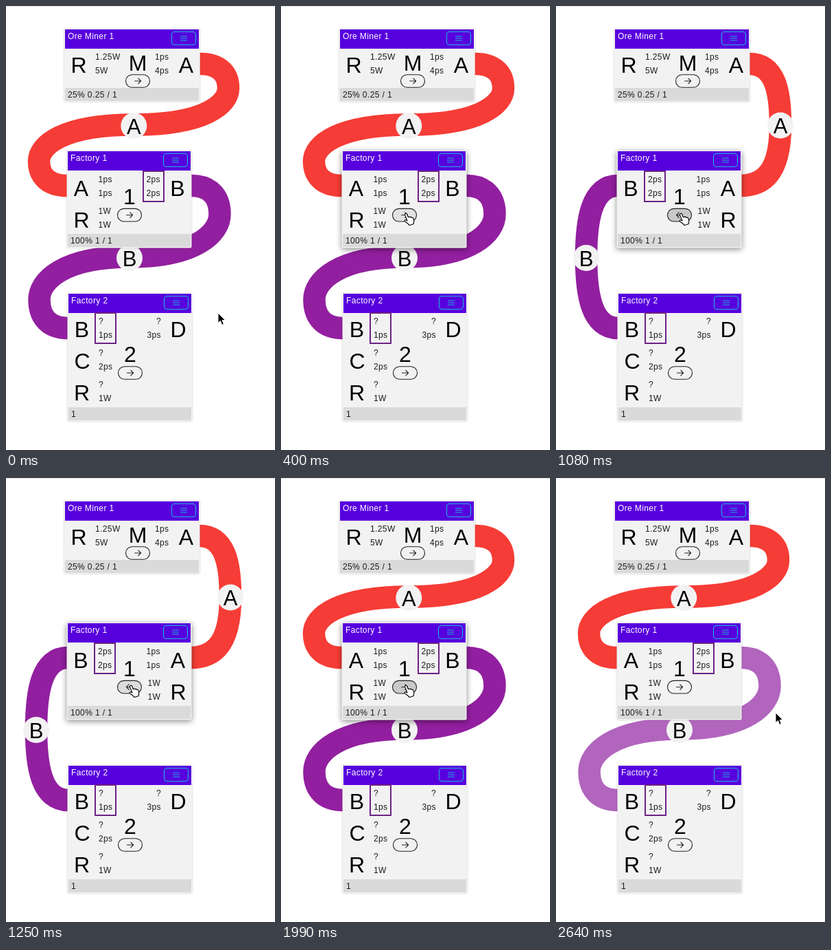
Animation of 392 by 645 pixels, one loop 2720 ms. Source, as an HTML page:

```html
<!DOCTYPE html>
<html lang="en">
<head>
<meta charset="utf-8">
<title>Factory flow</title>
<style>
html, body { margin: 0; width: 100%; height: 100%; overflow: hidden; background: #fff; }
svg { display: block; font: 12px "Liberation Sans", Arial, sans-serif; fill: #1c1c1c; }
.small { letter-spacing: .38px; }
.title { fill: #fff; }
.big { font-size: 32px; text-anchor: middle; fill: #000; }
.label { font-size: 31px; text-anchor: middle; fill: #000; }
.pipe { fill: none; stroke-width: 32.5; }
.line { fill: none; stroke-width: 1.1; stroke-linecap: round; stroke-linejoin: round; }
.box { fill: none; stroke: #6c2383; stroke-width: 2; }
.body { fill: #f2f2f2; filter: drop-shadow(0 0 1px #0003); }
.body.raised { filter: drop-shadow(0 2px 4px #0007); }
</style>
</head>
<body>
<svg id="stage" width="392" height="645" viewBox="0 0 392 645"></svg>
<script>
const LOOP = 2720, STEP = 80;
const RED = '#f63c36', PURPLE = '#921f9f', PURPLE_HOVER = '#b165bd';

const small = (x, y, s, cls = '') => `<text class="small ${cls}" x="${x}" y="${y}">${s}</text>`;
const big = (x, y, s) => `<text class="big" x="${x}" y="${y}">${s}</text>`;
const pair = (x, y, a, b) => small(x, y, a) + small(x, y + 20, b);
const box = (x, y) => `<rect class="box" x="${x}" y="${y}" width="30" height="44"/>`;

const pipe = (d, color) => `<path class="pipe" stroke="${color}" d="${d}"/>`;
const label = (x, y, s) =>
  `<circle cx="${x}" cy="${y}" r="19" fill="#f2f2f2"/><text class="label" x="${x}" y="${y + 11.5}">${s}</text>`;

// S-shaped pipe: a tight corner, then a long run into the flat middle, and the same mirrored
function bend(x1, y1, x2, y2) {
  const mx = (x1 + x2) / 2, my = (y1 + y2) / 2, h = my - y1;
  const right = x1 + 41.5, left = x2 - 41.5;
  return `M${x1},${y1}C${x1 + 26},${y1} ${right},${y1 + .14 * h} ${right},${y1 + .4 * h}` +
    `S${right - 34},${my} ${mx},${my}` +
    `C${left + 34},${my} ${left},${y2 - .66 * h} ${left},${y2 - .4 * h}` +
    `C${left},${y2 - .14 * h} ${x2 - 26},${y2} ${x2},${y2}`;
}

function pill(x, y, dir = 1, fill = 'none') {
  return `<g class="line" stroke="#222" transform="translate(${x} ${y})">
    <rect x="-17.5" y="-9.3" width="35" height="18.6" rx="9.3" fill="${fill}"/>
    <path transform="scale(${dir} 1)" d="M-4.5,0H4.5M.8,-3.8L4.6,0L.8,3.8"/></g>`;
}

function card(x, y, w, h, title, status, content, raised) {
  const r = x + w, b = y + h;
  return `<rect class="body ${raised ? 'raised' : ''}" x="${x - 1.5}" y="${y - 1}" width="${w + 3}" height="${h + 2.5}" rx="2"/>
    <rect x="${x}" y="${y}" width="${w}" height="28" fill="#5700de"/>
    <rect x="${x}" y="${b - 19}" width="${w}" height="19" fill="#dadada"/>
    <g class="line" stroke="#1bb4dc">
      <rect x="${r - 39.5}" y="${y + 3.5}" width="35" height="19" rx="4"/>
      <path d="M${r - 26.5},${y + 10}h9m-9,3h9m-9,3h9"/></g>
    ${small(x + 4, y + 14, title, 'title')}${small(x + 4, b - 5, status)}${content}`;
}

const minerCard = card(86, 34, 195, 104, 'Ore Miner 1', '25% 0.25 / 1',
  big(106, 97, 'R') + pair(130, 78, '1.25W', '5W') + big(192, 94, 'M') + pill(192, 109) +
  pair(217, 78, '1ps', '4ps') + big(262.5, 97, 'A'));

const lastCard = card(91, 418, 179, 184, 'Factory 2', '1',
  big(110.5, 481, 'B') + big(111, 527, 'C') + big(110.5, 573, 'R') +
  pair(135, 462, '?', '1ps') + pair(135, 508, '?', '2ps') + pair(135, 554, '?', '1W') +
  box(130, 446) + big(181, 517, '2') + pill(181, 533) +
  small(219, 462, '?') + small(205.5, 482, '3ps') + big(251, 481, 'D'));

function middleCard(flipped, raised, fill) {
  const sides = flipped
    ? big(109, 276, 'B') + box(129, 240) + pair(134, 256, '2ps', '2ps') +
      pair(204.5, 256, '1ps', '1ps') + pair(206.5, 302, '1W', '1W') +
      big(250.5, 276, 'A') + big(251, 322, 'R')
    : big(109.5, 276, 'A') + big(110, 322, 'R') + pair(134.5, 256, '1ps', '1ps') +
      pair(134.5, 302, '1W', '1W') + box(200, 240) +
      pair(204.5, 256, '2ps', '2ps') + big(250, 276, 'B');
  return card(90, 211, 179, 139, 'Factory 1', '100% 1 / 1',
    sides + big(180, 288, '1') + pill(180, 303.7, flipped ? -1 : 1, fill), raised);
}

function pipes(flipped, purple) {
  return flipped
    ? pipe('M281,84C320,84 327,125 327,173S316,261 269,261', RED) + label(327, 173.5, 'A') +
      pipe('M90,261C52,261 44,310 44,365S52,468 91,468', purple) + label(44, 366, 'B')
    : pipe(bend(282.5, 84, 89.5, 261), RED) + label(186.3, 174, 'A') +
      pipe(bend(270, 261, 90, 468), purple) + label(180, 366, 'B');
}

const arrow = (x, y) => `<path transform="translate(${x} ${y})" fill="#000" stroke="#fff" stroke-width="1"
  d="M0,0V14.5L3.4,11.4L5.8,17.3L8.4,16.2L6,10.5H10.6Z"/>`;
const hand = `<path transform="translate(180 301)" fill="#fff" stroke="#000" stroke-width="1.1" stroke-linejoin="round"
  d="M1,.8C2,-.2 3.2,.4 3.6,1.6L5.4,6C5.8,4.7 7.4,4.8 8,6C8.6,5 10,5.2 10.5,6.6C11.4,5.9 12.5,6.4 13,7.8
  C14,10.5 14,12.5 13.4,15.5L7.2,17.6C5.5,15 3,13.8 .6,11.8C-.4,10.6 .8,9.3 2.4,10L4,11L.6,2.6C.3,1.8 .5,1.2 1,.8Z"/>`;

// Button fill by start time: hover, press, ripple, fade
const FILLS = [[0, 'none'], [400, '#e1e1e1'], [1000, '#d8d8d8'], [1080, '#c9c9c9'], [1250, '#dcdcdc'],
  [1910, '#d5d5d5'], [1990, '#c9c9c9'], [2070, '#d8d8d8'], [2230, '#e1e1e1'], [2640, 'none']];

function cursor(t) {
  if (t >= 2640) return { x: 320, y: 341 };
  const u = Math.min(Math.floor(t / STEP) / 5, 1), p = u * u * (3 - 2 * u);
  return { x: 309 - 128 * p, y: 446 - 144 * p, onButton: u === 1, onCard: u >= .6 };
}

function scene(t) {
  const c = cursor(t), flipped = t >= 1080 && t < 1990;
  const fill = FILLS.findLast(([start]) => t >= start)[1];
  return '<rect width="392" height="1.5" fill="#ededed"/>' +
    pipes(flipped, t >= 2640 ? PURPLE_HOVER : PURPLE) + minerCard +
    middleCard(flipped, c.onCard, fill) + lastCard + (c.onButton ? hand : arrow(c.x, c.y));
}

const stage = document.getElementById('stage'), begin = performance.now();
let shown = '';
function frame() {
  const next = scene((performance.now() - begin) % LOOP);
  if (next !== shown) stage.innerHTML = shown = next;
  requestAnimationFrame(frame);
}
frame();
</script>
</body>
</html>
```
